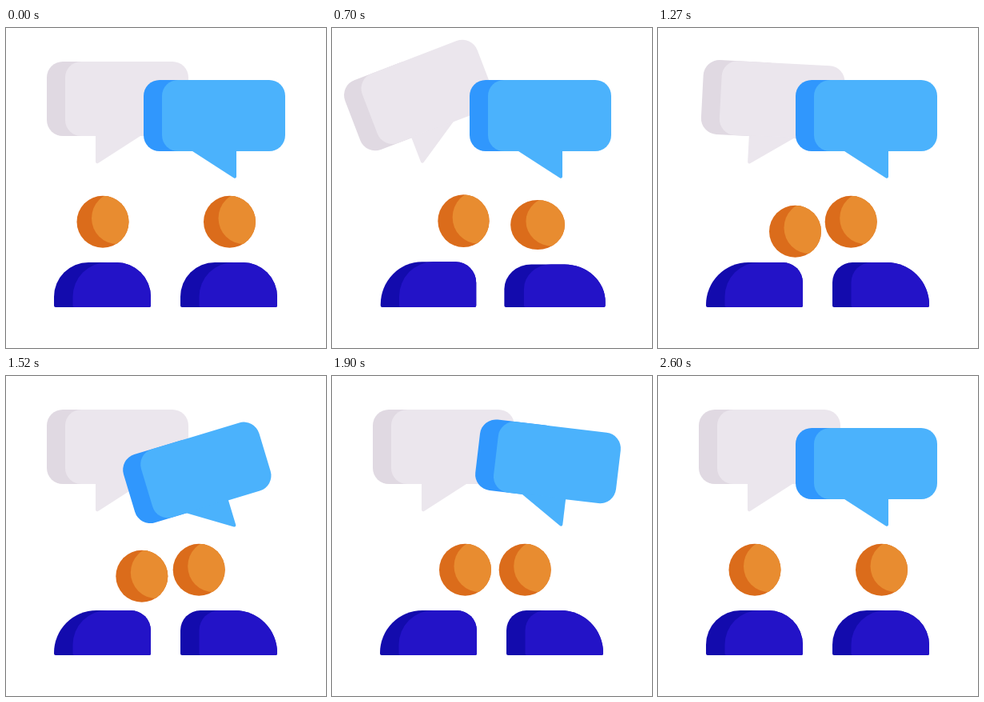
Write an HTML page with a canvas that moves like this. It is 400 by 400 pixels and loops after 2.62 s.

```html
<!DOCTYPE html>
<html>
<head>
<meta charset="utf-8">
<style>
html, body { margin: 0; width: 100%; height: 100%; overflow: hidden; background: #fff; }
canvas { display: block; }
</style>
</head>
<body>
<canvas id="stage" width="400" height="400"></canvas>
<script>
const ctx = document.getElementById('stage').getContext('2d');
const LOOP = 2620, MOVE = 220, NOD = 300, BOUNCE = 100;

// Steep ease-in-out from 0 to 1, clamped
function ease(u) {
  u = Math.min(1, Math.max(0, u));
  return u < 0.5 ? (2 * u) ** 2.5 / 2 : 1 - (2 - 2 * u) ** 2.5 / 2;
}

// 0 → 1 starting at `from`, back to 0 starting at `to`
const hold = (t, from, to, duration) =>
  ease((t - from) / duration) - ease((t - to) / duration);

// From rest through each peak in turn and back to rest, one step apiece
function wobble(t, start, step, peaks) {
  const pos = (t - start) / step, i = Math.floor(pos);
  const a = peaks[i - 1] || 0, b = peaks[i] || 0;
  return a + (b - a) * ease(pos - i);
}

function fillBox(color, x, y, w, h, radii) {
  ctx.fillStyle = color;
  ctx.beginPath();
  ctx.roundRect(x, y, w, h, radii);
  ctx.fill();
}

function fillDisc(color, x, y, r) {
  ctx.fillStyle = color;
  ctx.beginPath();
  ctx.arc(x, y, r, 0, 2 * Math.PI);
  ctx.fill();
}

// Runs draw with the origin at (x, y), flattened by the squash amount
function at(x, y, squash, draw) {
  ctx.save();
  ctx.translate(x, y);
  ctx.scale(1 + 0.046 * squash, 1 - 0.046 * squash);
  draw();
  ctx.restore();
}

// The bubble swings around the tip of its tail
function bubble(b, t) {
  const base = b.y + b.h - 1;
  at(b.tailX, b.tipY, 0, () => {
    ctx.rotate(wobble(t, b.start, b.step, [-21, 15, -9, 3]) * Math.PI / 180);
    ctx.translate(-b.tailX, -b.tipY);
    fillBox(b.dark, b.x, b.y, 100, b.h, 20);
    fillBox(b.light, b.x + 23, b.y, 154, b.h, 20);
    ctx.beginPath();
    ctx.moveTo(b.tailX, base);
    ctx.arcTo(b.tailX, b.tipY + 1, b.slantX, base, 2);
    ctx.lineTo(b.slantX, base);
    ctx.fill();
  });
}

function person(p, t) {
  const lean = hold(t, p.enter, p.exit, MOVE);
  const nod = p.nods ? hold(t, 700, 1393, NOD) : 0;
  const bounceIn = wobble(t, p.enter, BOUNCE, [1, -0.35]);
  const bounceOut = wobble(t, p.exit, BOUNCE, [1, -0.35]);
  const squash = bounceIn + bounceOut;

  at(p.x, 349, squash, () => {
    const outer = 43 + 10 * lean, inner = 43 - 18 * lean;
    const [left, right] = p.shift > 0 ? [outer, inner] : [inner, outer];
    fillBox('#130bad', -60.5, -56, 121, 56, [left, right, 2, 2]);
    fillBox('#2313c7', -37, -56, 97.5, 56, [Math.min(left, 43), right, 2, 2]);
  });

  const headX = p.headX + p.shift * lean + 5 * nod;
  const headY = 242.2 + 12 * nod + 4 * bounceIn + 12 * bounceOut;
  at(headX, headY, squash, () => {
    fillDisc('#db6c1b', 0, 0, 32.5);
    ctx.clip();
    fillDisc('#e88c30', 18.5, -4.5, 32.5);
  });
}

const bubbles = [
  { x: 51, y: 42, h: 93, tailX: 112, tipY: 170, slantX: 169.5,
    dark: '#e0d9e2', light: '#ebe6ed', start: 515, step: 192 },
  { x: 172, y: 65, h: 89, tailX: 288, tipY: 188.5, slantX: 231.5,
    dark: '#3097fd', light: '#4bb2fc', start: 1381, step: 214 }
];

const people = [
  { x: 120.5, headX: 121, shift: 45.5, enter: 523, exit: 2200, nods: true },
  { x: 278.5, headX: 279.5, shift: -38.3, enter: 583, exit: 2048, nods: false }
];

const begin = performance.now();

function frame() {
  const t = (performance.now() - begin) % LOOP;
  ctx.fillStyle = '#fff';
  ctx.fillRect(0, 0, 400, 400);
  bubbles.forEach(b => bubble(b, t));
  people.forEach(p => person(p, t));
  requestAnimationFrame(frame);
}
frame();
</script>
</body>
</html>
```
